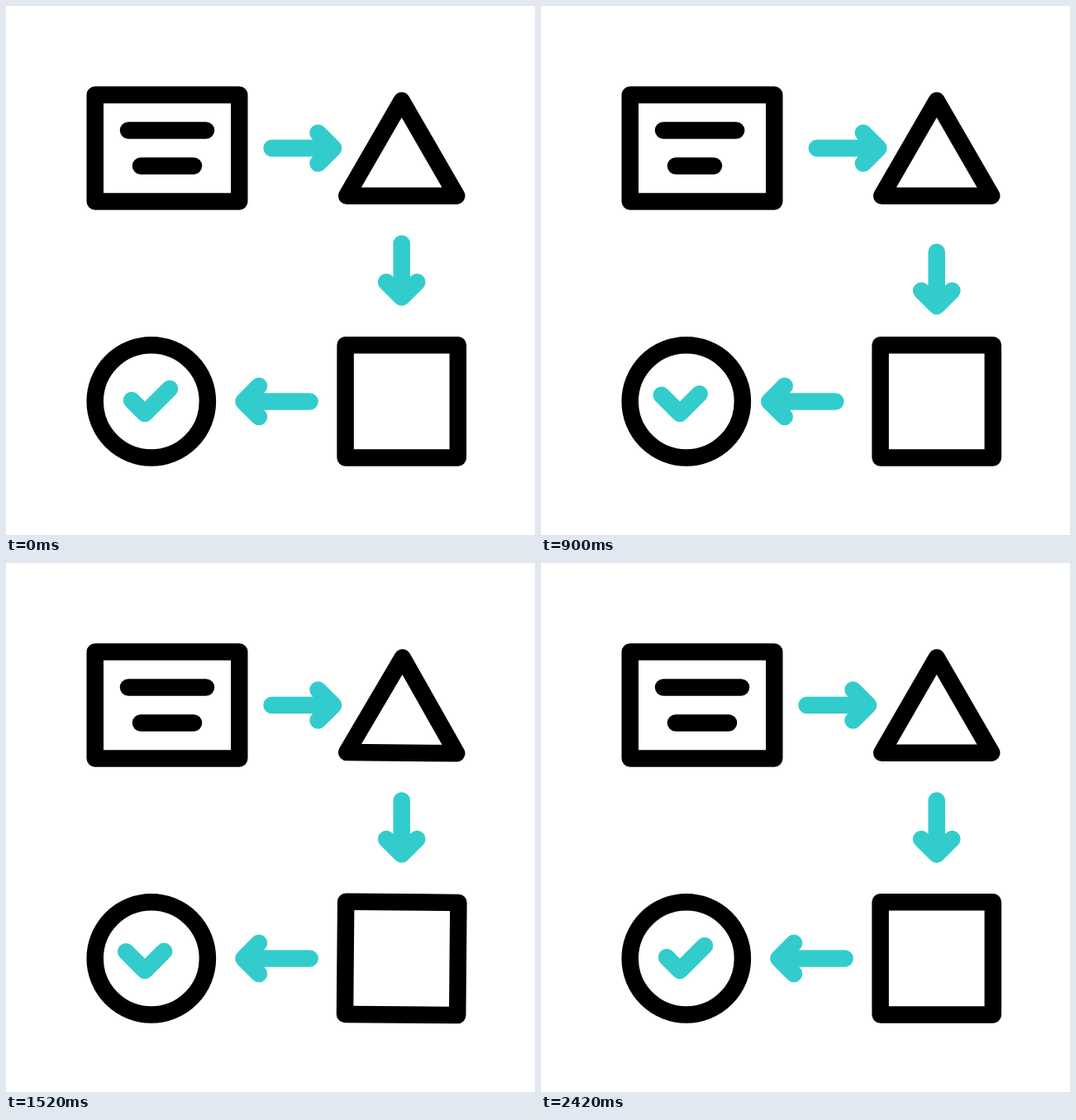
Animation of 640 by 640 pixels, one loop 2620 ms. Source, as an HTML page:

```html
<!DOCTYPE html>
<html lang="en">
<head>
<meta charset="utf-8">
<title>Flow chart</title>
<style>
  html, body { margin: 0; width: 100%; height: 100%; overflow: hidden; background: #fff; }
  svg { display: block; width: 100%; height: 100%; }
  g { stroke-width: 20.5; stroke-linecap: round; stroke-linejoin: round; }
  .flow { fill: none; stroke: #33cccc; }
  .box { fill: #fff; stroke: #000; }
</style>
</head>
<body>
<svg viewBox="0 0 640 640">
  <defs>
    <clipPath id="gap"><rect x="190" y="120" width="289" height="100"/></clipPath>
    <path id="right" d="M321.5 172H396M377.5 153.4L396.1 172L377.5 190.6"/>
    <path id="down" d="M478.7 287.4V352.6M460.1 334L478.7 352.6L497.3 334"/>
    <path id="left" d="M367.6 478.4H287.4M306 459.8L287.4 478.4L306 497"/>
  </defs>
  <g class="flow">
    <g clip-path="url(#gap)"><use href="#right"/><use href="#right"/></g>
    <use href="#down"/><use href="#down"/>
    <use href="#left"/><use href="#left"/>
  </g>
  <g class="box">
    <rect x="107.75" y="107.5" width="174.5" height="129"/>
    <path id="top"/>
    <path id="bottom"/>
    <path id="triangle" d="M478.7 114.5L545.2 229.7H412.2Z"/>
    <rect id="square" x="410.6" y="410.3" width="136.2" height="136.2"/>
    <circle cx="175.8" cy="478.4" r="68.1"/>
  </g>
  <g class="flow"><path id="check"/></g>
</svg>
<script>
const LOOP = 2620, END = 2400, SWING = 600, CYCLE = 800;
const $ = id => document.getElementById(id);
const set = (id, name, value) => $(id).setAttribute(name, value);

// Smooth interpolation through [time, value] keys
function ease(t, keys) {
  if (t <= keys[0][0]) return keys[0][1];
  for (let i = 1; i < keys.length; i++) {
    const [t0, a] = keys[i - 1], [t1, b] = keys[i];
    if (t < t1) {
      const x = (t - t0) / (t1 - t0);
      return a + (b - a) * x * x * (3 - 2 * x);
    }
  }
  return keys[keys.length - 1][1];
}

const swing = (t, values) => ease(t, values.map((v, i) => [i * SWING, v]));

// A text line shrinks, overshoots by a tenth and settles
const lineLength = (t, start, full, min) => ease(t, [
  [start, full], [start + 240, min], [start + 400, full * 1.1], [start + 560, full]
]);

// One copy leaves while the next one arrives a full step behind
function moveArrow(id, dx, dy, p) {
  document.querySelectorAll(`use[href="#${id}"]`).forEach((el, i) => {
    el.setAttribute("transform", `translate(${dx * (p - i)} ${dy * (p - i)})`);
  });
}

function draw(time) {
  const t = Math.min(time % LOOP, END);
  const local = t % CYCLE;

  const p = ease(local, [[0, 0], [600, 1]]);
  moveArrow("right", 166.5, 0, p);
  moveArrow("down", 0, 141, p);
  moveArrow("left", -152, 0, p);

  set("top", "d", `M148 150.5h${lineLength(local, 60, 94, 15)}`);
  set("bottom", "d", `M163 193.5h${lineLength(local, 0, 64, 16)}`);

  const angle = swing(t, [0, 5, -5, 5, 0]);
  set("triangle", "transform", `rotate(${angle} 478.7 227)`);
  set("square", "transform", `rotate(${angle} 478.7 478.4)`);

  const c = swing(t, [0, -12.5, 0, -12.5, 0]);
  set("check", "d", `M${152 + c} ${477 + c}L168 493L${198 + c} ${463 - c}`);
}

let start;
function tick(now) {
  if (start === undefined) start = now;
  draw(now - start);
  requestAnimationFrame(tick);
}
draw(0);
requestAnimationFrame(tick);
</script>
</body>
</html>
```
